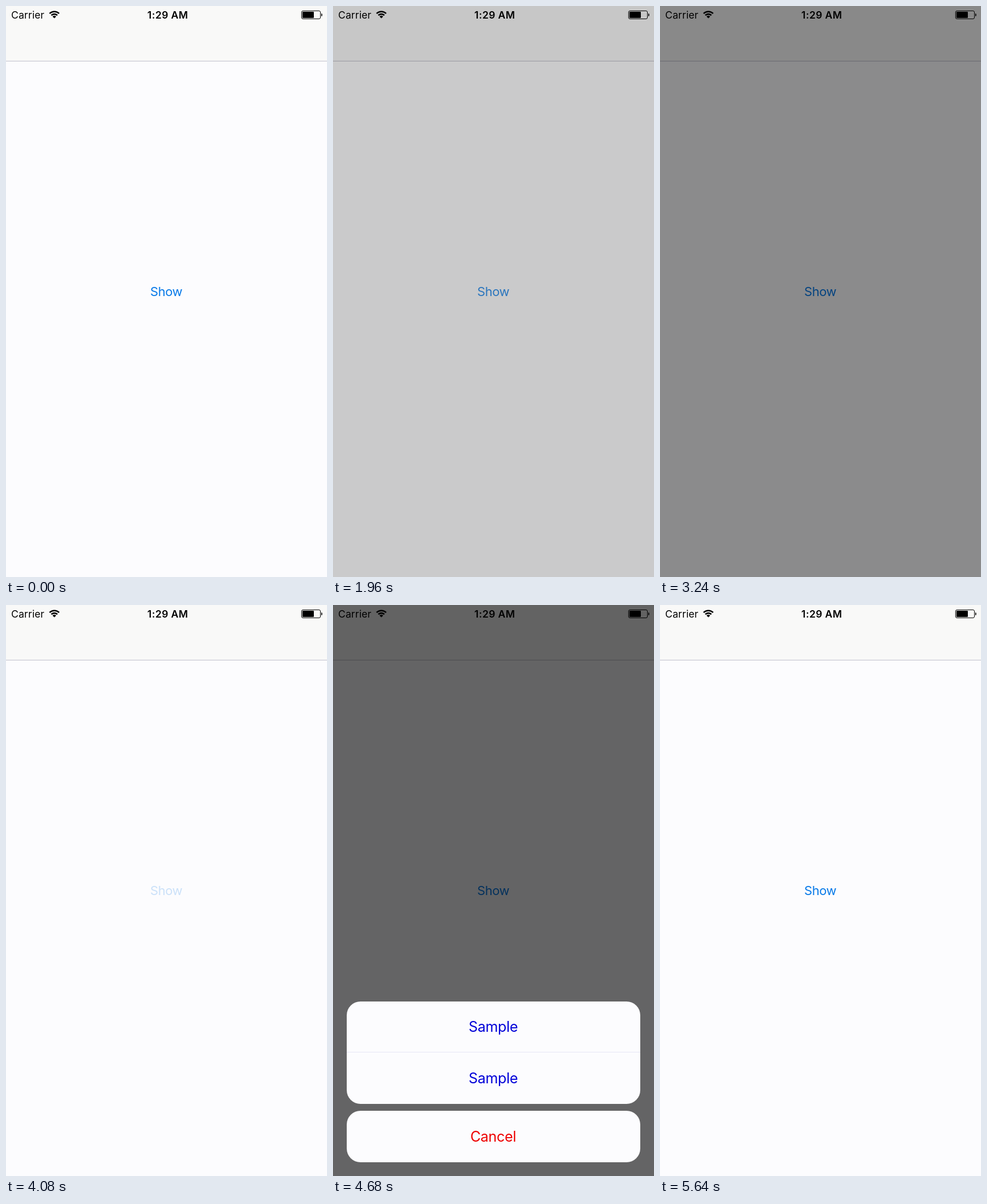
These frames come from a looping animation (561 by 998 pixels, 5680 ms). An HTML page with a canvas:

```html
<!DOCTYPE html>
<html lang="en">
<head>
<meta charset="utf-8">
<title>Action sheet</title>
<style>
html, body { margin: 0; width: 100%; height: 100%; overflow: hidden; background: #fcfcfe; }
canvas { display: block; width: 561px; height: 998px; }
</style>
</head>
<body>
<canvas id="stage" width="561" height="998"></canvas>
<script>
const W = 561, H = 998, LOOP = 5680;
const FONT = 'Inter, "Helvetica Neue", "Liberation Sans", sans-serif';
const ctx = document.getElementById('stage').getContext('2d');

// Touch, release, then the backdrop and the sheet, in and out
const shows = [
  { down: 1560, up: 1720, dimIn: 1884, sheetIn: 2070, sheetOut: 3080, dimOut: 3170 },
  { down: 4080, up: 4160, dimIn: 4284, sheetIn: 4470, sheetOut: 5320, dimOut: 5410 }
];
const DIM = 0.6, DIM_IN = 200, SHEET_IN = 170, SHEET_OUT = 130, DIM_OUT = 220, RELEASE = 350;

const part = (t, start, length) => Math.min(1, Math.max(0, (t - start) / length));
const inOut = p => p * p * (3 - 2 * p);
const easeOut = p => 1 - (1 - p) ** 2;
const easeIn = p => p * p;

function text(str, x, y, size, color, { weight = 400, align = 'center', spacing = 0 } = {}) {
  ctx.font = `${weight} ${size}px ${FONT}`;
  ctx.letterSpacing = spacing + 'px';
  ctx.textAlign = align;
  ctx.textBaseline = 'alphabetic';
  ctx.fillStyle = color;
  ctx.fillText(str, x, y);
}

function rounded(x, y, w, h, r) {
  ctx.beginPath();
  ctx.roundRect(x, y, w, h, r);
}

function wifi(x, y) {
  const half = Math.PI * 0.25;
  ctx.strokeStyle = ctx.fillStyle = '#000';
  ctx.lineWidth = 2.6;
  for (const r of [7.4, 11.8]) {
    ctx.beginPath();
    ctx.arc(x, y, r, -Math.PI / 2 - half, -Math.PI / 2 + half);
    ctx.stroke();
  }
  ctx.beginPath();
  ctx.moveTo(x, y);
  ctx.arc(x, y, 4.4, -Math.PI / 2 - half, -Math.PI / 2 + half);
  ctx.fill();
}

function battery() {
  ctx.strokeStyle = ctx.fillStyle = '#000';
  ctx.lineWidth = 1;
  rounded(516.5, 8.5, 33, 14, 2.5);
  ctx.stroke();
  rounded(518, 10, 20, 11, 1);
  ctx.fill();
  rounded(551, 13, 1.6, 5, [0, 1.5, 1.5, 0]);
  ctx.fill();
}

function page(buttonAlpha, dim) {
  ctx.fillStyle = '#fcfcfe';
  ctx.fillRect(0, 0, W, H);
  ctx.fillStyle = '#f9f9f8';
  ctx.fillRect(0, 0, W, 96);
  ctx.fillStyle = '#c8c8d2';
  ctx.fillRect(0, 95.8, W, 1.2);
  ctx.globalAlpha = buttonAlpha;
  text('Show', 280, 507, 22, '#087ae8', { spacing: -0.5 });
  ctx.globalAlpha = 1;
  ctx.fillStyle = `rgba(0,0,0,${dim})`;
  ctx.fillRect(0, 0, W, H);
}

function statusBar() {
  text('Carrier', 9, 22, 17.5, '#000', { align: 'left', spacing: 0.1 });
  wifi(84.5, 21.5);
  text('1:29 AM', 282.7, 22, 17.5, '#000', { weight: 600, spacing: 0.4 });
  battery();
}

function sheet(shift) {
  ctx.save();
  ctx.translate(0, shift);
  ctx.fillStyle = '#fcfcfe';
  rounded(24, 693, 513, 179, 24);
  ctx.fill();
  rounded(24, 884, 513, 90, 24);
  ctx.fill();
  ctx.fillStyle = '#e6e6f6';
  ctx.fillRect(24, 781, 513, 1);
  text('Sample', 280, 746, 25, '#0000d8', { spacing: -0.3 });
  text('Sample', 280, 836, 25, '#0000d8', { spacing: -0.3 });
  text('Cancel', 280, 938, 25, '#ee0000', { spacing: -0.3 });
  ctx.restore();
}

function draw(t) {
  let dim = 0, raised = 0, button = 1;
  for (const s of shows) {
    dim += DIM * (inOut(part(t, s.dimIn, DIM_IN)) - inOut(part(t, s.dimOut, DIM_OUT)));
    raised += easeOut(part(t, s.sheetIn, SHEET_IN)) - easeIn(part(t, s.sheetOut, SHEET_OUT));
    if (t >= s.down) button = 0.2 + 0.8 * inOut(part(t, s.up, RELEASE));
  }
  page(button, dim);
  statusBar();
  if (raised > 0) sheet((1 - raised) * (H - 693));
}

const began = performance.now();
function tick() {
  draw((performance.now() - began) % LOOP);
  requestAnimationFrame(tick);
}
tick();
</script>
</body>
</html>
```
